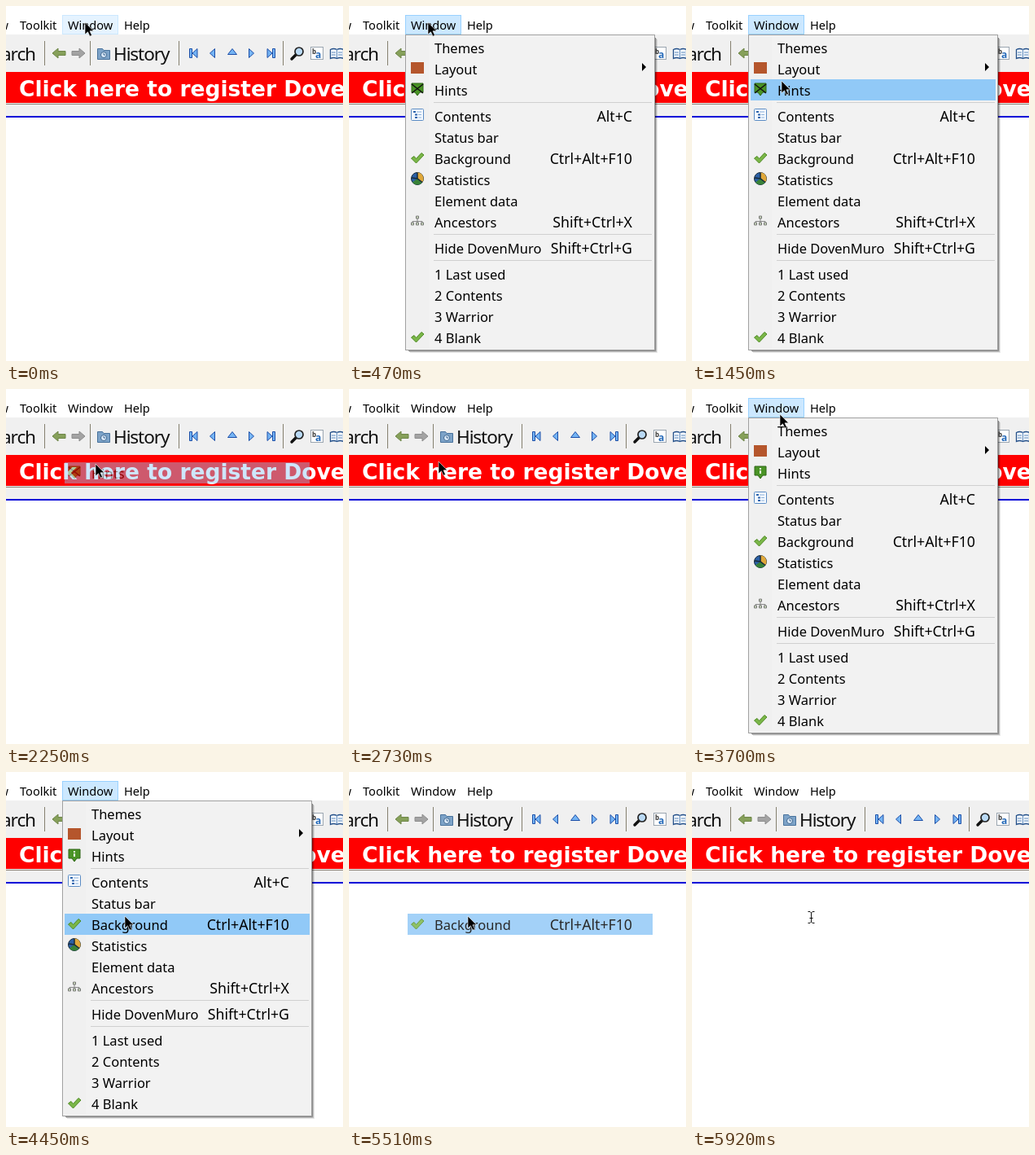
Recreate the animation shown at these times as an HTML page. Size 414x436 px, loop 6710 ms.

```html
<!DOCTYPE html>
<html lang="en">
<head>
<meta charset="utf-8">
<title>Window menu</title>
<style>
  html, body { margin: 0; width: 100%; height: 100%; overflow: hidden; background: #fff; }
  svg { display: block; width: 414px; height: 436px; font-family: "Noto Sans", "Open Sans", sans-serif; fill: #000; }
  .bar { font-size: 14.6px; }
  .tool { font-size: 22.6px; letter-spacing: -1.1px; fill: #111; }
  .banner { font: bold 26.5px "DejaVu Sans", sans-serif; fill: #fff; }
  .label { font-size: 16.5px; }
  .keys { font-size: 17.7px; text-anchor: end; }
  .nav { fill: #74b4f4; stroke: #1d4fa8; stroke-linejoin: round; }
  .shadow path { fill: none; stroke: #000; }
</style>
</head>
<body>
<svg viewBox="0 0 414 436">
  <defs>
    <path id="tick" d="M-7.500 0l3.500-2.500 2.500 3L5-6.500 8-4-1.500 6z" fill="#7ab648" stroke="#4d8a22"/>
    <rect id="tile" x="-8" y="-8" width="16" height="14" fill="#b5562c"/>
    <path id="bubble" d="M-7-8h14v11h-4l-3 4-3-4h-4z" fill="#4a9426" stroke="#2c6415"/>
    <g id="hintOff">
      <use href="#bubble"/>
      <path d="M-7-7L7 4M7-7L-7 4" stroke="#111" stroke-width="1.500"/>
    </g>
    <g id="hintOn">
      <use href="#bubble"/>
      <path d="M0-6v2M0-3v4" stroke="#fff" stroke-width="2"/>
    </g>
    <g id="list">
      <rect x="-7.500" y="-8.500" width="15" height="14" rx="1" fill="#f4f9ff" stroke="#5b8cc4"/>
      <path d="M-5-5h3M-3-1.500h3M-3 2h3" stroke="#2e65ad" stroke-width="2"/>
      <path d="M-1-5h6M1-1.500h4M1 2h4" stroke="#8cb0da"/>
    </g>
    <g id="pie">
      <circle cy="-1" r="7.500" fill="#2b5fa5" stroke="#182b3a"/>
      <path d="M0-1V-8.500A7.500 7.500 0 0 1 6 3.500z" fill="#e0a83a"/>
      <path d="M0-1L6 3.500A7.500 7.500 0 0 1-6 3.500z" fill="#388238"/>
      <path d="M-7-2L0-1 6 3.500M0-1V-8" fill="none" stroke="#182b3a" stroke-width="1.500"/>
    </g>
    <g id="tree">
      <path d="M0-5v4M-6 2v-2.500h12V2M0-1v3" fill="none" stroke="#888"/>
      <path d="M-1.500-7h3v3h-3zM-7.500 1h3v3h-3zM-1.500 1h3v3h-3zM4.500 1h3v3h-3z" fill="#c9d6bd" stroke="#555" stroke-width=".7"/>
    </g>
  </defs>

  <rect width="414" height="436" fill="#fff"/>
  <rect y="35" width="414" height="101" fill="#f0f0f0"/>
  <rect id="tab" x="69.500" y="11.500" width="68" height="23"/>
  <g class="bar">
    <text x="3" y="29" text-anchor="end">View</text>
    <text x="17" y="29">Toolkit</text>
    <text x="76" y="29">Window</text>
    <text x="145" y="29">Help</text>
  </g>

  <path d="M47.500 43v30M103.500 43v30M212.500 43v30M340.500 43v30" stroke="#85806f"/>
  <text class="tool" x="36" y="67" text-anchor="end">Search</text>
  <text class="tool" x="132" y="67">History</text>
  <path d="M57 58l7-6v3.500h9v5h-9V64z" fill="#86a05a" stroke="#6d8547"/>
  <path d="M97 58l-7-6v3.500h-9v5h9V64z" fill="#a3a3a3" stroke="#8c8c8c"/>
  <path d="M112.500 65.500v-13h6l1.500 2h7.500v11z" fill="#7da3c8" stroke="#47719b"/>
  <circle cx="120" cy="60" r="3.500" fill="#dceafa" stroke="#3c658d"/>
  <path d="M120 58v2h2" fill="none" stroke="#3c658d"/>
  <g class="nav">
    <path d="M225.500 52.500h3v11h-3zM235 52.500v11l-6-5.500z"/>
    <path d="M256.500 52.500v11l-6-5.500z"/>
    <path d="M272.500 59.500l5.500-7 5.500 7z"/>
    <path d="M298.500 52.500v11l6-5.500z"/>
    <path d="M327.500 52.500h3v11h-3zM321 52.500v11l6-5.500z"/>
  </g>
  <path d="M351 65l6-6" stroke="#111" stroke-width="3.500" stroke-linecap="round"/>
  <circle cx="360" cy="56" r="5" fill="#b9d9f5" stroke="#222" stroke-width="1.700"/>
  <rect x="374.500" y="50.500" width="15" height="15" fill="#fff" stroke="#9aa5b0"/>
  <text x="376" y="59" font-size="8" font-weight="bold" fill="#333">b</text>
  <text x="380" y="64" font-size="12" font-weight="bold" fill="#2368b8">a</text>
  <path d="M398.500 53.500q4-2 8 0 4-2 8 0v11q-4-2-8 0-4-2-8 0z" fill="#f5faff" stroke="#234f88" stroke-width="1.300"/>
  <path d="M406.500 53v11M400 57h5M400 60h5M408 57h5M408 60h5" stroke="#5b86b8"/>

  <rect y="81" width="414" height="38" fill="#f00"/>
  <text class="banner" x="16" y="111">Click here to register DovenMuro</text>
  <path d="M0 120.500h414" stroke="#8a8478"/>
  <path d="M0 136h414" stroke="#0000d8" stroke-width="2"/>

  <g id="menu">
    <g class="shadow">
      <path d="M73 423.500h303.500V39" opacity=".45"/>
      <path d="M74 424.500h303.500V40" opacity=".25"/>
      <path d="M75 425.500h303.500V41" opacity=".1"/>
    </g>
    <rect x="69.500" y="35.500" width="306" height="387" fill="#f2f2f2" stroke="#a0a0a0"/>
    <rect x="72" y="38" width="26" height="382" fill="#f0f0f0"/>
    <path d="M104 118.500h268M104 280.500h268M104 312.500h268" stroke="#d0d0d0"/>
    <rect id="hot" x="72" width="301" height="26" fill="#91c9f7"/>
    <g id="rows"></g>
  </g>
  <g id="flash"></g>

  <path id="pointer" d="M0 0v15l3.500-3.200 2.500 5.400 2.500-1.100-2.500-5.300h4.700z" stroke="#fff" stroke-width=".6"/>
  <path id="beam" d="M142.500 171.500h2.500l1.500 1.500 1.500-1.500h2.500M146.500 173v11M142.500 185.500h2.500l1.500-1.500 1.500 1.500h2.500M144.500 179.500h4" fill="none" stroke="#111"/>
</svg>
<script>
  const LOOP = 6710;
  const $ = id => document.getElementById(id);

  // centre y, label, shortcut, icon
  const items = [
    [52, "Themes"],
    [78, "Layout", "", "tile"],
    [104, "Hints", "", "hintOff"],
    [136, "Contents", "Alt+C", "list"],
    [162, "Status bar"],
    [188, "Background", "Ctrl+Alt+F10", "tick"],
    [214, "Statistics", "", "pie"],
    [240, "Element data"],
    [266, "Ancestors", "Shift+Ctrl+X", "tree"],
    [298, "Hide DovenMuro", "Shift+Ctrl+G"],
    [330, "1 Last used"],
    [356, "2 Contents"],
    [382, "3 Warrior"],
    [408, "4 Blank", "", "tick"]
  ];
  const HINTS = items[2], BACKGROUND = items[5];

  const row = ([y, label, keys = "", icon]) =>
    (icon ? `<use href="#${icon}" x="84" y="${y - 1}"/>` : "") +
    `<text class="label" x="105" y="${y + 6}">${label}</text>` +
    `<text class="keys" x="348" y="${y + 6}">${keys}</text>`;

  const hotRow = item =>
    `<g><rect x="72" y="${item[0] - 14}" width="301" height="26" fill="#91c9f7"/>${row(item)}</g>`;

  $("rows").innerHTML = items.map(row).join("") +
    '<path d="M360 70l5 5-5 5z"/>';
  $("flash").innerHTML = hotRow(HINTS) + hotRow(BACKGROUND);
  const [hintFlash, backFlash] = $("flash").children;
  const hintIcon = $("rows").querySelector('[href="#hintOff"]');

  // Progress in n visible steps, the first at a and the last at b
  const steps = (t, a, b, n) => t < a ? 0 :
    Math.min(1, (Math.floor((t - a) / (b - a) * (n - 1) + 1e-6) + 1) / n);
  const smooth = p => p * p * (3 - 2 * p);

  const moves = [
    [1100, 1450, 6, 110, 92],
    [2660, 3090, 7, 108, 31],
    [3960, 4450, 8, 146, 177]
  ];

  function pointerAt(t) {
    let x = 97, y = 20;
    for (const [a, b, n, toX, toY] of moves) {
      const p = smooth(steps(t, a, b, n));
      x += (toX - x) * p;
      y += (toY - y) * p;
    }
    return [x, y];
  }

  const fade = (t, a, b, n) => t < a ? 0 : 1 - steps(t, a, b, n);
  const show = (el, on) => el.setAttribute("visibility", on ? "visible" : "hidden");

  function draw(t) {
    const [x, y] = pointerAt(t);
    const open = t < 1980 ? steps(t, 260, 470, 4)
      : t < 5510 ? steps(t, 3490, 3700, 4) : 0;
    const over = items.find(([c]) => y >= c - 14 && y < c + 12);
    const hover = y >= 11 && y < 35;

    $("menu").setAttribute("opacity", open);
    $("hot").setAttribute("opacity", over ? 1 : 0);
    if (over) $("hot").setAttribute("y", over[0] - 14);
    hintIcon.setAttribute("href", t < 1980 ? "#hintOff" : "#hintOn");

    hintFlash.setAttribute("opacity", fade(t, 1980, 2520, 9));
    backFlash.setAttribute("opacity", fade(t, 5510, 5920, 6));

    show($("tab"), open || hover);
    $("tab").setAttribute("fill", open ? "#cce8ff" : "#e5f3ff");
    $("tab").setAttribute("stroke", open ? "#99d1ff" : "#cce8ff");

    const typing = t >= 5590;
    show($("pointer"), !typing);
    show($("beam"), typing);
    $("pointer").setAttribute("transform", `translate(${Math.round(x)} ${Math.round(y)})`);
  }

  const start = performance.now();
  function tick() {
    draw((performance.now() - start) % LOOP);
    requestAnimationFrame(tick);
  }
  tick();
</script>
</body>
</html>
```
